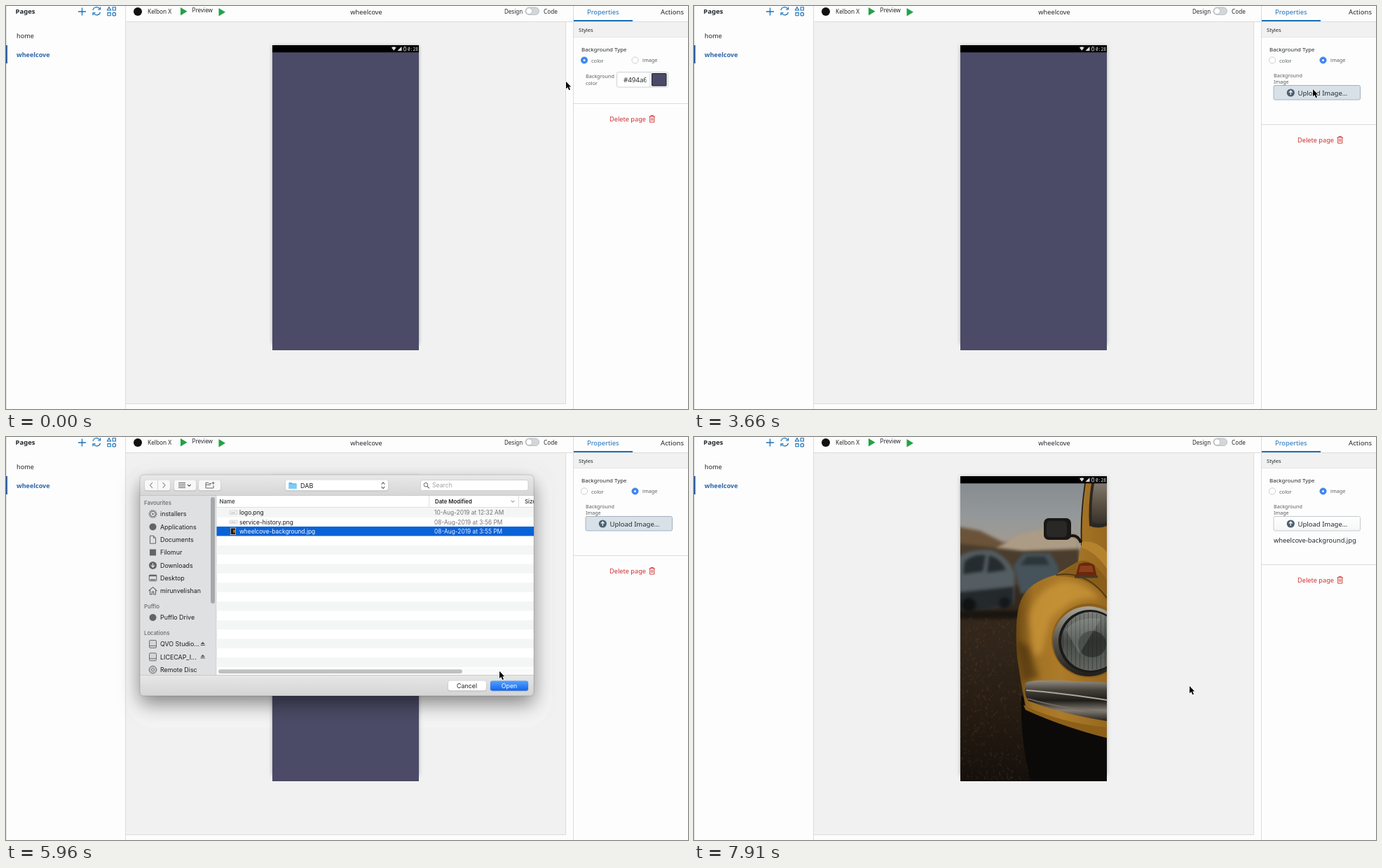
These frames come from a looping animation (973 by 576 pixels, 8000 ms). An HTML page with a canvas:

```html
<!DOCTYPE html>
<html lang="en">
<head>
<meta charset="utf-8">
<title>Page builder</title>
<style>
html, body { margin: 0; width: 100%; height: 100%; overflow: hidden; background: #fdfdfd; }
canvas { display: block; width: 973px; height: 576px; }
</style>
</head>
<body>
<canvas id="stage"></canvas>
<script>
const W = 973, H = 576, LOOP = 8000;
const UI = '"Noto Sans", "Open Sans", sans-serif';
const MAC = 'Inter, Roboto, sans-serif';
const MONO = '"Noto Sans Mono", monospace';
const BLUE = '#1a70b8', INK = '#24282c', GREY = '#5b5f63', LINE = '#dcdcdc', NAVY = '#4b4b67';
const PROJECT = 'wheelcove';

const canvas = document.getElementById('stage');
const ctx = canvas.getContext('2d');
const dpr = window.devicePixelRatio || 1;
canvas.width = W * dpr;
canvas.height = H * dpr;
ctx.scale(dpr, dpr);

// ---- helpers ----
function text(s, x, y, size, color = INK, weight = 400, family = UI, align = 'left') {
  ctx.font = `${weight} ${size}px ${family}`;
  ctx.textAlign = align;
  ctx.fillStyle = color;
  ctx.fillText(s, x, y + size * 0.36);
}
const mac = (s, x, y, size = 8.9, color = '#1c1c1c', weight = 400, align = 'left') =>
  text(s, x, y, size, color, weight, MAC, align);

function rect(x, y, w, h, fill) {
  ctx.fillStyle = fill;
  ctx.fillRect(x, y, w, h);
}
function paint(fill, stroke, width = 1) {
  if (fill) { ctx.fillStyle = fill; ctx.fill(); }
  if (stroke) { ctx.strokeStyle = stroke; ctx.lineWidth = width; ctx.stroke(); }
}
function round(x, y, w, h, r, fill, stroke, width) {
  ctx.beginPath();
  ctx.roundRect(x, y, w, h, r);
  paint(fill, stroke, width);
}
function oval(x, y, rx, ry, fill, stroke, width) {
  ctx.beginPath();
  ctx.ellipse(x, y, rx, ry, 0, 0, Math.PI * 2);
  paint(fill, stroke, width);
}
const disc = (x, y, r, fill, stroke, width) => oval(x, y, r, r, fill, stroke, width);
function shape(d, fill, stroke, width) {
  const p = new Path2D(d);
  if (fill) { ctx.fillStyle = fill; ctx.fill(p); }
  if (stroke) { ctx.strokeStyle = stroke; ctx.lineWidth = width || 1; ctx.stroke(p); }
}
function fade(y0, y1, ...colors) {
  const g = ctx.createLinearGradient(0, y0, 0, y1);
  colors.forEach((c, i) => g.addColorStop(i / (colors.length - 1), c));
  return g;
}
function shadow(color, blur, dy = 0) {
  ctx.shadowColor = color;
  ctx.shadowBlur = blur * dpr;
  ctx.shadowOffsetY = dy * dpr;
}
function isolate(draw) {
  ctx.save();
  draw();
  ctx.restore();
}
function clipTo(x, y, w, h, draw) {
  isolate(() => {
    ctx.beginPath();
    ctx.rect(x, y, w, h);
    ctx.clip();
    draw();
  });
}

// ---- pointer: [first step, last step, steps, x, y] ----
const moves = [
  [120, 120, 1, 824, 91], [270, 620, 4, 853, 81], [860, 1210, 4, 899.5, 75],
  [2160, 2160, 1, 897, 75], [2310, 2310, 1, 896, 75], [3050, 3280, 3, 883, 119],
  [4260, 4500, 3, 656, 99], [4740, 5080, 4, 604.5, 132], [5550, 5550, 1, 607, 143.5],
  [5690, 5690, 1, 702, 320.5], [5960, 6080, 2, 706, 349], [6230, 6350, 2, 706.5, 356],
  [6740, 6740, 1, 706, 357], [7100, 7100, 1, 707, 356]
];
function pointerAt(t) {
  let x = 799, y = 108;
  for (const [t0, t1, n, tx, ty] of moves) {
    if (t < t0) break;
    const gap = n > 1 ? (t1 - t0) / (n - 1) : 1;
    const k = Math.min(n, Math.floor((t - t0) / gap + 0.01) + 1) / n;
    x += (tx - x) * k;
    y += (ty - y) * k;
  }
  return [x, y];
}
function drawPointer(t) {
  isolate(() => {
    ctx.translate(...pointerAt(t));
    ctx.lineJoin = 'round';
    const arrow = 'M0 0V10.2L2.4 8.1L4.2 12.2L6 11.4L4.2 7.4H7.2Z';
    shape(arrow, null, '#fff', 1.2);
    shape(arrow, '#000');
  });
}

// ---- app frame ----
function drawSidebar() {
  rect(0, 0, 170, H, '#fdfdfd');
  rect(0, 0, 1, H, LINE);
  rect(170, 0, 1, H, LINE);
  text('Pages', 13.5, 8, 9.5, INK, 700);
  shape('M103 8H114M108.5 2.5V13.5', null, BLUE, 1.3);
  shape('M124 6A5.3 5.3 0 0 1 133.8 4.3M134.5 9A5.3 5.3 0 0 1 125 10.5', null, BLUE, 1.2);
  shape('M134.6 1.5V5H131M124 13.2V9.8H127.6', null, BLUE, 1.2);
  shape('M147 1.6L149.6 6H144.4ZM152.2 1.8H156.4V6H152.2ZM145 9.6H149.2V13.8H145Z', null, BLUE, 1.1);
  disc(154.3, 11.7, 2.3, null, BLUE, 1.1);
  text('home', 15, 42.5, 9.2);
  rect(0, 56, 2, 26, '#315f9f');
  text(PROJECT, 15, 69.5, 9, '#2e64a8', 700);
}

function drawCanvasArea(dimmed) {
  rect(171, 0, 638, H, '#fdfdfd');
  rect(171, 22, 627, 546, '#f1f1f1');
  if (dimmed) round(171, 40, 608, 375, 40, '#f4f4f4');
  rect(171, 22, 638, 1, LINE);
  rect(798, 22, 1, 546, LINE);
  rect(171, 568, 628, 1, LINE);
  disc(188, 8, 6, '#111');
  text('Kelbon X', 202, 8, 8.3);
  shape('M249 2L258.5 7.7L249 13.4Z', '#24a148');
  text('Preview', 265.5, 6, 8.1);
  shape('M303.5 3L313 8.7L303.5 14.4Z', '#24a148');
  text(PROJECT, 514, 8.5, 9.2, INK, 400, UI, 'center');
  text('Design', 711, 8, 8);
  round(741, 2, 19.5, 10.5, 5.2, '#d3d7da', '#aeb3b7', 0.8);
  disc(746.3, 7.2, 4.4, '#fff', '#aeb3b7', 0.8);
  text('Code', 767, 8, 8.2);
}

function drawPhone(t) {
  isolate(() => {
    shadow('rgba(0,0,0,.3)', 5, 1);
    rect(380, 56, 209, 426, '#fdfdfd');
  });
  if (t < 7100) rect(380, 66, 209, 426, NAVY);
  else if (t >= 7910) clipTo(380, 66, 209, 426, drawPhoto);
  rect(380, 56, 209, 10.3, '#000');
  shape('M550 59.6Q553.3 56.8 556.6 59.6L553.3 63.8Z', '#ddd');
  shape('M558.5 64H564.5V58Z', '#ddd');
  round(567.6, 59, 3, 5, 0.6, null, '#ddd', 0.8);
  rect(568.4, 57.8, 1.4, 1, '#ddd');
  text('0:28', 573, 61.3, 6.2, '#eee', 400, MONO);
}

// ---- photo of a yellow car in a field, in flat tones ----
function seeded(seed) {
  return () => (seed = (seed * 16807) % 2147483647) / 2147483647;
}
function drawField() {
  rect(380, 66, 209, 426, fade(66, 160, '#868c90', '#94989a', '#a49b8e'));
  isolate(() => {
    ctx.filter = 'blur(2px)';
    shape('M376 128L408 134L440 150L480 155L545 140V200H376Z', '#6b533a');
    shape('M430 160L462 140L505 131L548 144V166H430Z', '#ad9c85');
    shape('M376 152L420 157L470 163L550 160V230H376Z', '#4a3d2d');
    rect(376, 212, 220, 290, fade(212, 492, '#382a1d', '#30251a', '#251b12', '#15100b'));
    shape('M376 172Q392 160 425 162Q446 170 458 194L456 238L390 250L376 244Z', '#535d62');
    shape('M386 178Q400 166 416 169L412 192L384 196ZM421 169Q438 174 445 190L418 194Z', '#252b2e');
    shape('M378 222L456 214V240L390 252L376 246Z', '#24292b');
    disc(392, 240, 10, '#101214');
    disc(443, 237, 8, '#15181a');
    shape('M456 184L470 166H508L520 186V218L466 224Z', '#46535a');
    shape('M466 183L475 171H501L507 183Z', '#2c3539');
    rect(376, 248, 90, 12, '#1b1510');
  });
  const rnd = seeded(77);
  ctx.lineWidth = 0.9;
  for (let i = 0; i < 700; i++) {
    const x = 380 + rnd() * 120, y = 258 + rnd() * 234;
    ctx.strokeStyle = `rgba(${95 + rnd() * 55 | 0},82,58,${0.1 + rnd() * 0.3})`;
    ctx.beginPath();
    ctx.moveTo(x, y);
    ctx.lineTo(x + rnd() * 8 - 4, y - 1 - rnd() * 4);
    ctx.stroke();
  }
}
function drawPhoto() {
  drawField();
  shape('M467 370Q465 430 480 492H589V415Z', '#0c0a08');

  // bodywork
  const body = ctx.createLinearGradient(458, 0, 589, 0);
  body.addColorStop(0, '#684612');
  body.addColorStop(0.2, '#a07125');
  body.addColorStop(0.5, '#ad7b29');
  body.addColorStop(1, '#976820');
  shape('M559 66H589V430Q525 414 473 386Q466 350 461 315Q456 250 469 228Q480 207 516 197L548 178L553 150Q551 126 555 104Z', body);
  shape('M567 66H589V127Q577 132 564 127Q562 98 567 66Z', '#2b2723');
  shape('M571 66H589V122Q578 126 568 122Q566 96 571 66Z', fade(66, 125, '#81796d', '#5b5144', '#37302a'));
  shape('M558 66Q551 115 553 154Q568 160 589 181', null, '#2a1d0f', 1.8);
  shape('M553 150Q572 146 589 164V188Q572 164 553 158Z', '#b5822e');
  shape('M548 178Q567 170 589 204V235Q570 198 516 199Z', '#8a5e1a');
  shape('M516 197Q560 190 589 230', null, '#493110', 1.6);
  isolate(() => {
    ctx.filter = 'blur(4px)';
    shape('M478 258Q486 215 530 206Q560 206 580 232Q535 226 508 262L496 310L484 312Z', 'rgba(207,154,60,.7)');
    shape('M461 290L478 300L492 344L470 350Z', 'rgba(62,39,10,.55)');
  });
  shape('M470 383Q520 408 589 415V430Q525 414 473 390Z', '#8d6019');

  // mirror and indicator
  shape('M535 142Q547 138 552 151', null, '#171411', 4);
  round(499, 116, 39, 31, 7, '#191817');
  round(503, 120, 29, 23, 5, '#2a2826');
  shape('M544 200L549 182Q560 176 571 183L575 200Z', '#67290f');
  shape('M551 184H568L570 193H549Z', '#8b3f19');
  rect(543, 198, 33, 3.5, '#4a3824');

  // headlight
  oval(564, 291, 54, 53, '#8b5f1b');
  oval(563, 292, 51, 50, fade(242, 342, '#a9a69b', '#55514a', '#211e1a'));
  oval(565, 292, 45, 45, '#1c1a18');
  oval(566, 292, 42, 42, fade(250, 334, '#7c807b', '#474c48', '#62655f'));
  isolate(() => {
    ctx.beginPath();
    ctx.ellipse(566, 292, 41, 41, 0, 0, 7);
    ctx.clip();
    for (let x = 526; x < 589; x += 6) rect(x, 250, 1, 84, 'rgba(25,28,26,.4)');
    oval(568, 296, 20, 19, 'rgba(32,35,32,.6)');
    shape('M530 275Q550 255 580 260L550 310Z', 'rgba(215,220,214,.16)');
  });

  // bumper
  shape('M473 352Q478 347 520 348L589 351V406Q525 396 477 377Q470 369 473 352Z',
    fade(348, 405, '#918d84', '#443f39', '#1f1c19', '#827c72', '#292520'));
  shape('M474 362Q525 366 589 376', null, '#aba698', 1.8);
  shape('M476 374Q525 388 589 394', null, '#746d62', 1.6);
}

// ---- properties panel ----
function radio(x, y, on) {
  disc(x, y, 4.6, on ? '#3d86f0' : '#fff', on ? '#3d86f0' : '#c4c8cb', 0.9);
  if (on) disc(x, y, 1.5, '#fff');
}
function drawPanel(t) {
  const image = t >= 2580, loaded = t >= 7100;
  rect(809, 0, 164, H, '#fdfdfd');
  rect(809, 0, 1, H, LINE);
  rect(810, 22, 163, 23, '#f1f1f1');
  rect(810, 22, 163, 1, LINE);
  rect(810, 44, 163, 1, '#e6e6e6');
  rect(810, 20, 84, 2, BLUE);
  text('Properties', 829, 8.3, 9.4, BLUE);
  text('Actions', 934, 8.3, 9.6);
  text('Styles', 817, 33.8, 7.6);
  text('Background Type', 821, 62, 7.9, INK, 500);
  radio(825, 77.5, !image);
  text('color', 835, 77.8, 7.5, GREY);
  radio(897.5, 77.5, image);
  text('image', 908, 77.8, 7.3, GREY);
  text('Background', 827, image ? 99 : 100.5, 7.2, GREY);
  if (image) {
    text('Image', 827, 108.6, 7.2, GREY);
    drawUpload(t >= 3660 && !loaded);
    if (loaded) text(PROJECT + '-background.jpg', 827, 147.5, 9.3);
  } else {
    text('color', 827, 110.5, 7.2, GREY);
    round(871.5, 94.5, 73, 21.5, 2, '#fff', '#cfd2d4');
    rect(918.5, 95, 1, 21, '#cfd2d4');
    clipTo(873, 96, 40.5, 19, () => text('#494a66', 881, 105.3, 9.7));
    round(921.5, 96.5, 20.5, 17.5, 0.5, NAVY, '#1b1b22');
  }
  const end = loaded ? 182 : image ? 169 : 139;
  rect(810, end, 163, 1, LINE);
  const y = end + 22.5, red = '#cf2e2e';
  text('Delete page', 861, y, 9.2, red);
  shape(`M917.5 ${y - 3.5}H926M920 ${y - 3.5}V${y - 5}H923.5V${y - 3.5}M918.6 ${y - 3.5}V${y + 4.6}H924.9V${y - 3.5}M920.8 ${y - 1.5}V${y + 2.5}M922.8 ${y - 1.5}V${y + 2.5}`, null, red, 0.9);
}
function drawUpload(hover) {
  const fill = hover ? '#d8e1e8' : fade(113, 134, '#fff', '#f5f6f7');
  round(827, 113.5, 123.5, 20.5, 2, fill, hover ? '#a3b3c0' : '#c6cacd');
  disc(851.3, 124, 5.6, '#4d6070');
  shape('M851.3 127V121.5M848.9 123.6L851.3 121.1L853.7 123.6', null, '#fff', 1.2);
  text('Upload Image...', 861.5, 124.3, 9.5);
}

// ---- file dialog ----
const ICON = '#626466';
const icons = {
  gear(y) {
    isolate(() => {
      ctx.setLineDash([1.2, 1.2]);
      disc(209.5, y, 5.2, null, ICON, 1.6);
    });
    disc(209.5, y, 3.8, null, ICON, 1);
    disc(209.5, y, 1.2, ICON);
  },
  dot(y) { disc(209.5, y, 5, ICON); },
  square(y) { rect(205, y - 4.5, 9, 9, ICON); },
  page(y) {
    shape(`M205.5 ${y - 5.5}H210.5L213.5 ${y - 2.5}V${y + 5.5}H205.5ZM210.5 ${y - 5.5}V${y - 2.5}H213.5`, null, ICON);
  },
  down(y) {
    disc(209.5, y, 5.5, ICON);
    shape(`M209.5 ${y - 3}V${y + 2.5}M207 ${y}L209.5 ${y + 2.7}L212 ${y}`, null, '#e2e3e4', 1.2);
  },
  desk(y) {
    round(204.3, y - 4.5, 10.5, 8.5, 0.8, null, ICON);
    rect(204.3, y - 4.5, 10.5, 2, ICON);
    rect(205.5, y + 1.4, 8, 1.4, ICON);
  },
  house(y) {
    shape(`M203.6 ${y}L209.5 ${y - 5.3}L215.4 ${y}M205.5 ${y - 1}V${y + 5}H208.3V${y + 1}H210.7V${y + 5}H213.5V${y - 1}`, null, ICON, 1.1);
  },
  disk(y) {
    round(204.5, y - 5.5, 10, 11, 1.5, '#d4d5d7', ICON, 0.9);
    rect(205, y + 2, 9, 0.9, ICON);
  },
  wheel(y) {
    disc(209.5, y, 5.3, '#c3c4c6', ICON, 1);
    disc(209.5, y, 1.8, '#e4e5e6', ICON, 0.9);
  }
};
const places = [
  ['gear', 'installers', 110], ['dot', 'Applications', 128.4], ['page', 'Documents', 146.7],
  ['square', 'Filomur', 165], ['down', 'Downloads', 183.4], ['desk', 'Desktop', 201.7],
  ['house', 'mirunvelishan', 220], ['dot', 'Pufflo Drive', 258], ['disk', 'QVO Studio...', 296],
  ['disk', 'LICECAP_I...', 314.3], ['wheel', 'Remote Disc', 332.6]
];
const files = [
  ['logo.png', '10-Aug-2019 at 12:32 AM'],
  ['service-history.png', '08-Aug-2019 at 3:56 PM'],
  [PROJECT + '-background.jpg', '08-Aug-2019 at 3:55 PM']
];

function macButton(x, y, w, h, fill = '#fff') {
  isolate(() => {
    shadow('rgba(0,0,0,.3)', 1.5, 0.6);
    round(x, y, w, h, 3, fill);
  });
}
function drawToolbar() {
  macButton(198, 61.5, 36, 15, '#f8f8f8');
  rect(216, 61.5, 0.8, 15, '#d0d0d0');
  shape('M209 65L205.5 69L209 73', null, '#858585', 1.1);
  shape('M223.5 65L227 69L223.5 73', null, '#858585', 1.1);
  macButton(240, 61.5, 31, 15, '#f8f8f8');
  shape('M246 65.5H256M246 67.8H256M246 70.1H256M246 72.4H256', null, '#555', 0.9);
  shape('M259 68L261.3 70.2L263.6 68', null, '#555', 1.1);
  macButton(275, 61.5, 31, 15, '#f8f8f8');
  shape('M285 73V65.3H288.5L289.7 66.5H293M285 73H296V69M285 68.3H292M295.5 63.8V67.8M293.5 65.8H297.5', null, '#555', 0.9);
  macButton(399, 61.5, 146, 15);
  shape('M403.5 65H407.5L408.7 66.3H414.5V74H403.5Z', '#62b9e8');
  rect(403.5, 67.5, 11, 6.5, '#7cccf5');
  mac('DAB', 420, 69.3, 9);
  shape('M535.7 67.5L538 65L540.3 67.5M535.7 71L538 73.5L540.3 71', null, '#444', 1.1);
  round(591.5, 61.5, 153.5, 15, 3, '#fff', '#c9c9c9', 0.8);
  disc(599, 68.3, 2.8, null, '#666', 1);
  shape('M601 70.5L603.8 73.4', null, '#666', 1.1);
  mac('Search', 608, 69.3, 8.7, '#a2a2a2');
}
function drawPlaces() {
  rect(191, 83, 109, 257, '#dfe0e2');
  clipTo(191, 83, 109, 257, () => {
    [['Favourites', 94.5], ['Pufflo', 242.5], ['Locations', 280.5]]
      .forEach(([s, y]) => mac(s, 197, y, 7.8, '#66686a', 500));
    for (const [icon, label, y] of places) {
      icons[icon](y);
      mac(label, 220, y + 0.2);
      if (icon === 'disk') {
        shape(`M277.6 ${y}L280.7 ${y - 3.2}L283.8 ${y}Z`, '#555');
        rect(277.6, y + 1, 6.2, 1.1, '#555');
      }
    }
  });
  round(292, 86, 6, 152, 3, '#a7a8aa');
  rect(299.5, 83, 1, 257, '#c9c9c9');
}
function drawFiles(chosen) {
  const pitch = 13.38, top = 101.3;
  rect(300.5, 83, 452.5, 257, '#fff');
  clipTo(300.5, 83, 452.5, 257, () => {
    for (let i = 0; i < 18; i += 2) rect(300, top + i * pitch, 453, pitch, '#f4f5f5');
    mac('Name', 304.5, 92, 7.9, '#333', 500);
    mac('Date Modified', 612, 92, 7.8, '#222', 600);
    mac('Size', 740, 92, 7.9, '#333', 500);
    shape('M720.5 90.8L723 93.2L725.5 90.8', null, '#777', 1);
    rect(300, 100, 453, 0.8, '#d5d5d5');
    rect(603.5, 84, 0.8, 16, '#d5d5d5');
    rect(731, 84, 0.8, 16, '#d5d5d5');
    files.forEach(([name, date], i) => {
      const y = top + (i + 0.5) * pitch, on = chosen && i === 2;
      if (on) rect(300, y - pitch / 2, 453, pitch, '#0a62d8');
      if (i < 2) {
        round(319, y - 2.3, 11, 4.8, 0.5, '#f5f5f5', '#c5c5c5', 0.7);
        rect(321, y, 6, 0.8, '#a7a7a7');
      } else {
        rect(320, y - 5, 8, 10, on ? '#fff' : '#d0d0d0');
        rect(320.6, y - 4.4, 6.8, 8.8, '#211c18');
        rect(324, y - 2, 3.2, 4, '#a8752a');
      }
      mac(name, 333, y + 0.2, 8.35, on ? '#fff' : '#161616');
      mac(date, 611, y + 0.2, 8.35, on ? '#e5efff' : '#737373');
    });
    rect(300, 331, 453, 9, '#fafafa');
    round(303, 332.3, 348, 5.6, 2.8, '#c0c0c0');
  });
}
function drawDialog(t) {
  const chosen = t >= 5310;
  isolate(() => {
    shadow('rgba(0,0,0,.46)', 28, 11);
    round(191, 54, 562, 316, 5, '#e0e0e0');
  });
  isolate(() => {
    ctx.beginPath();
    ctx.roundRect(191, 54, 562, 316, 5);
    ctx.clip();
    rect(191, 54, 562, 29, fade(54, 83, '#e9e9e9', '#d6d6d6'));
    rect(191, 340, 562, 30, fade(340, 370, '#e7e7e7', '#d4d4d4'));
    drawPlaces();
    drawFiles(chosen);
    rect(191, 83, 562, 0.8, '#bdbdbd');
    rect(191, 340, 562, 0.8, '#c4c4c4');
  });
  round(191, 54, 562, 316, 5, null, 'rgba(0,0,0,.22)', 0.7);
  drawToolbar();
  macButton(631, 348.5, 54, 14);
  mac('Cancel', 657.5, 355.8, 8.9, '#222', 400, 'center');
  macButton(691, 348.5, 54, 14, chosen ? fade(348, 363, '#58a3fb', '#0d63f2') : '#ededed');
  mac('Open', 718, 355.8, 8.9, chosen ? '#fff' : '#b3b3b3', 400, 'center');
}

function render(t) {
  const picking = t >= 3900 && t < 7100;
  drawSidebar();
  drawCanvasArea(picking);
  drawPhone(t);
  drawPanel(t);
  if (picking) drawDialog(t);
  drawPointer(t);
}

const start = performance.now();
function tick() {
  render((performance.now() - start) % LOOP);
  requestAnimationFrame(tick);
}
tick();
</script>
</body>
</html>
```
